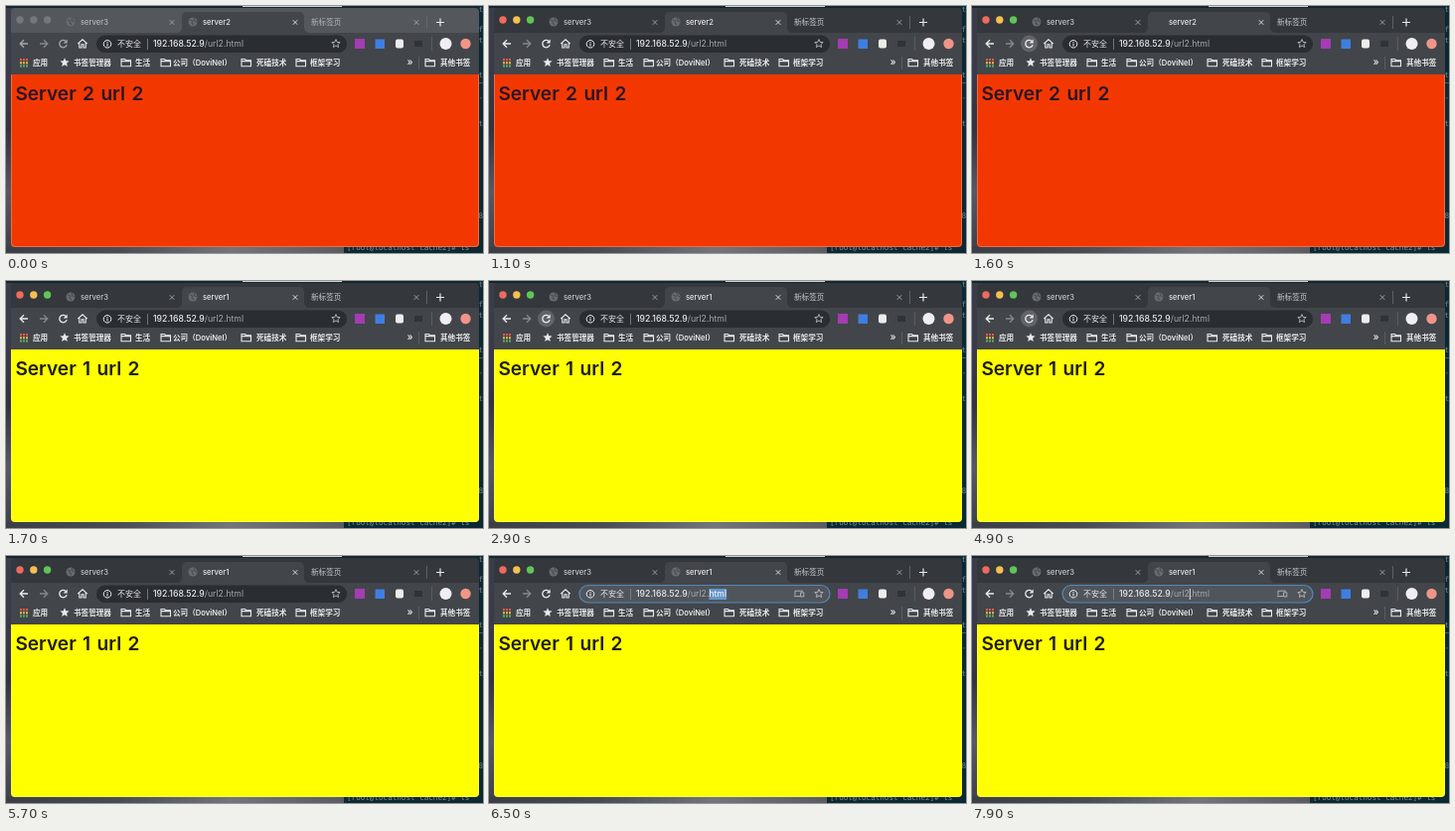
These frames come from a looping animation (480 by 249 pixels, 8000 ms). An HTML page with a canvas:

```html
<!DOCTYPE html>
<html lang="zh">
<head>
<meta charset="utf-8">
<style>
html, body { margin: 0; width: 100%; height: 100%; overflow: hidden; background: #20252d; }
canvas { display: block; width: 480px; height: 249px; }
</style>
</head>
<body>
<canvas></canvas>
<script>
const canvas = document.querySelector('canvas');
const ctx = canvas.getContext('2d');
const dpr = window.devicePixelRatio || 1;
canvas.width = 480 * dpr;
canvas.height = 249 * dpr;

const LOOP = 8000;
const SANS = 'Inter, "Noto Sans CJK SC", "Noto Sans CJK", sans-serif';
const MONO = '"DejaVu Sans Mono", monospace';
const STRIP = '#34373c', IDLE_STRIP = '#54575b', BAR = '#424549';
const FIELD = '#2a2d31', FOCUSED_FIELD = '#50555b';
const LIGHT = '#e8eaed', DIM = '#a5a8ad', FAINT = '#686b70';

const between = (t, a, b) => t >= a && t < b;

function rect(x, y, w, h, fill) {
  ctx.fillStyle = fill;
  ctx.fillRect(x, y, w, h);
}

function round(x, y, w, h, r, fill, stroke) {
  ctx.beginPath();
  ctx.roundRect(x, y, w, h, r);
  if (fill) { ctx.fillStyle = fill; ctx.fill(); }
  if (stroke) { ctx.strokeStyle = stroke; ctx.lineWidth = 1.2; ctx.stroke(); }
}

function disc(x, y, r, fill) {
  ctx.beginPath();
  ctx.arc(x, y, r, 0, Math.PI * 2);
  ctx.fillStyle = fill;
  ctx.fill();
}

function path(d, color, width = 1.2, x = 0, y = 0, filled = false) {
  ctx.save();
  ctx.translate(x, y);
  ctx.strokeStyle = ctx.fillStyle = color;
  ctx.lineWidth = width;
  const p = new Path2D(d);
  filled ? ctx.fill(p) : ctx.stroke(p);
  ctx.restore();
}

function text(str, x, y, size, color = LIGHT, weight = 500, family = SANS) {
  ctx.font = `${weight} ${size}px ${family}`;
  ctx.fillStyle = color;
  ctx.fillText(str, x, y);
  return x + ctx.measureText(str).width;
}

function gradient(x, y, ...colors) {
  const g = ctx.createLinearGradient(0, 0, x, y);
  colors.forEach((c, i) => g.addColorStop(i / (colors.length - 1), c));
  return g;
}

function star(x, y, r, color, filled) {
  let d = '';
  for (let i = 0; i < 10; i++) {
    const a = i * Math.PI / 5 - Math.PI / 2;
    const k = i % 2 ? r * 0.45 : r;
    d += (i ? 'L' : 'M') + Math.cos(a) * k + ' ' + Math.sin(a) * k;
  }
  path(d + 'Z', color, 0.9, x, y, filled);
}

function globe(x, y) {
  disc(x, y, 4.5, FAINT);
  path('M-3 -2 L0 -1 L-1 1 L1 3 M1 -4 L2 -1 L4 0', '#4b4e53', 1.1, x, y);
}

function folder(x) {
  path('M0 -3.5H3.5L4.7 -2.3H9.5V3.8H0ZM0 -1.4H9.5', LIGHT, 1.1, x, 57);
}

function desktop() {
  rect(0, 0, 480, 249, gradient(0, 249, '#3a3d4c', '#3b3a4b', '#33323f', '#565864', '#3d3f49'));
  rect(0, 243, 340, 6, gradient(340, 0, '#3c3e47', '#4a4c54', '#73757b', '#5a5c62'));
  rect(0, 0, 480, 2, '#14262e');
  rect(238, 0, 100, 1, '#cfd1d3');
  rect(340, 243, 140, 6, '#0b2933');
  rect(474, 0, 6, 249, '#0b2933');
  const scraps = { 4: 't', 24: 'f', 35: 't', 70: 't', 78: '~', 93: '-', 119: 't', 212: '8' };
  for (const y in scraps) text(scraps[y], 475.5, +y, 7.6, '#6f8a92', 400, MONO);
  text('[root@localhost cache2]# ls', 343, 244, 7.6, '#829198', 400, MONO);
}

function tabs(page, loading, active) {
  const label = active ? '#c6c9cd' : '#b4b7bb';
  round(5, 2, 471, 241, 4, active ? STRIP : IDLE_STRIP);
  ['#ef6a5f', '#f5c04f', '#60c556'].forEach((color, i) => {
    disc(14 + i * 13.8, 14, 3.7, active ? color : '#74777b');
  });
  path('M171 27Q177 27 177 21V11Q177 6 182 6H295Q300 6 300 11V21Q300 27 306 27Z', BAR, 1, 0, 0, true);
  globe(65, 16);
  if (!loading) globe(188, 16);
  text('server3', 75, 16.5, 7.6, label);
  text(page.tab, 198, 16.5, 7.6, LIGHT);
  text('新标签页', 307, 16.5, 7.6, label);
  for (const x of [167, 291, 413]) path('M-2.3 -2.3L2.3 2.3M2.3 -2.3L-2.3 2.3', x === 291 ? LIGHT : DIM, 0.9, x, 16.5);
  rect(423, 10, 0.8, 13, '#6a6d72');
  path('M-4 0H4M0 -4V4', LIGHT, 1.2, 437, 16.5);
}

function address(state) {
  const size = 8.7, y = 38.5;
  round(91, 29.5, 252, 17.5, 8.75, state.focused ? FOCUSED_FIELD : FIELD, state.focused ? '#5588bd' : null);
  path('M0 -3.8A3.8 3.8 0 1 1 -.01 -3.8M0 -.7V2.2M0 -2.2V-1.2', LIGHT, 1, 102, 38.3);
  text('不安全', 112, y, 8);
  rect(142, 33, 0.8, 11, '#85888d');
  const slash = text('192.168.52.9', 148, y, size);
  const dot = text('/url2', slash, y, size, DIM, 400);
  const ext = text('.', dot, y, size, DIM, 400);
  if (state.selected) rect(ext, 33, ctx.measureText('html').width, 11, '#6797c8');
  text('html', ext, y, size, state.selected ? '#ffffff' : DIM, 400);
  if (state.caret) rect(dot, 33, 0.9, 11, LIGHT);
  if (state.focused) {
    path('M-4 1.5V-2.8H4M-5 2.6H1M1.6 -1.2H4.8V3H1.6Z', '#b9bcc0', 0.9, 312, 38);
  }
  star(332, 38, 4.4, '#b9bcc0', false);
}

function toolbar(state) {
  const nav = state.active ? LIGHT : DIM;
  rect(5, 27, 471, 42, BAR);
  path('M4 0H-3.5M0 -3.8L-3.8 0L0 3.8', nav, 1.3, 18, 38);
  path('M-4 0H3.5M0 -3.8L3.8 0L0 3.8', '#85888d', 1.3, 38, 38);
  if (state.hover) disc(57.5, 38, 8.5, '#606368');
  path('M2.6 -2.6A3.7 3.7 0 1 0 3.6 1.1', nav, 1.3, 57.5, 38);
  path('M4.2 -4.4V-.4H.2Z', nav, 1, 57.5, 38, true);
  path('M-4.8 .2L0 -4.2L4.8 .2M-3.2 -.8V4H-1V.8H1V4H3.2V-.8', LIGHT, 1.1, 77, 38);
  address(state);

  rect(351, 33, 10, 10, '#a43cb4');
  rect(371.5, 33.5, 9.5, 9.5, '#3f7ee0');
  round(392, 33.5, 8, 9, 2, '#eceded');
  rect(411, 35, 8, 6, '#303337');
  rect(428, 31, 0.8, 14, '#606368');
  disc(442.5, 38, 6, '#f0eef3');
  disc(462.5, 38, 5.2, '#ef9588');
}

function bookmarks() {
  const dots = ['#e65a4f', '#e9b44a', '#58ad68'];
  for (let i = 0; i < 9; i++) {
    const row = Math.floor(i / 3);
    rect(14 + i % 3 * 3, 53 + row * 3.2, 2, 2.2, dots[row]);
  }
  star(59, 57, 4.8, LIGHT, true);
  [116, 156, 237, 292, 422].forEach(folder);
  const labels = [
    ['应用', 27], ['书签管理器', 68], ['生活', 130], ['公司（DoviNel）', 168],
    ['死磕技术', 252], ['框架学习', 306], ['其他书签', 437]
  ];
  for (const [label, x] of labels) text(label, x, 57.5, 7.6, LIGHT, 600);
  text('»', 403.5, 56.5, 10);
  rect(415, 51, 0.8, 13, '#606368');
}

function content(page) {
  round(5, 69, 471, 174, [0, 0, 4, 4], page.fill);
  path('M5.5 69V239Q5.5 242.5 9 242.5H472Q475.5 242.5 475.5 239V69', 'rgba(255,255,255,0.25)', 1);
  ctx.wordSpacing = '1.6px';
  text(page.title, 9.4, 89, 19.1, page.ink, 600);
  ctx.wordSpacing = '0px';
}

const RED = { tab: 'server2', title: 'Server 2 url 2', fill: '#f23800', ink: '#2a1427' };
const YELLOW = { tab: 'server1', title: 'Server 1 url 2', fill: '#ffff00', ink: '#1c1b16' };

function draw(t) {
  const page = t < 1700 ? RED : YELLOW;
  const state = {
    active: t >= 500,
    hover: between(t, 1300, 1700) || between(t, 1900, 5300),
    focused: t >= 6200,
    selected: between(t, 6400, 6800),
    caret: between(t, 6800, 7000) || t >= 7500
  };
  ctx.setTransform(dpr, 0, 0, dpr, 0, 0);
  ctx.textBaseline = 'middle';
  desktop();
  tabs(page, between(t, 1500, 1700), state.active);
  toolbar(state);
  bookmarks();
  content(page);
}

const start = performance.now();
function frame() {
  draw((performance.now() - start) % LOOP);
  requestAnimationFrame(frame);
}
frame();
</script>
</body>
</html>
```
